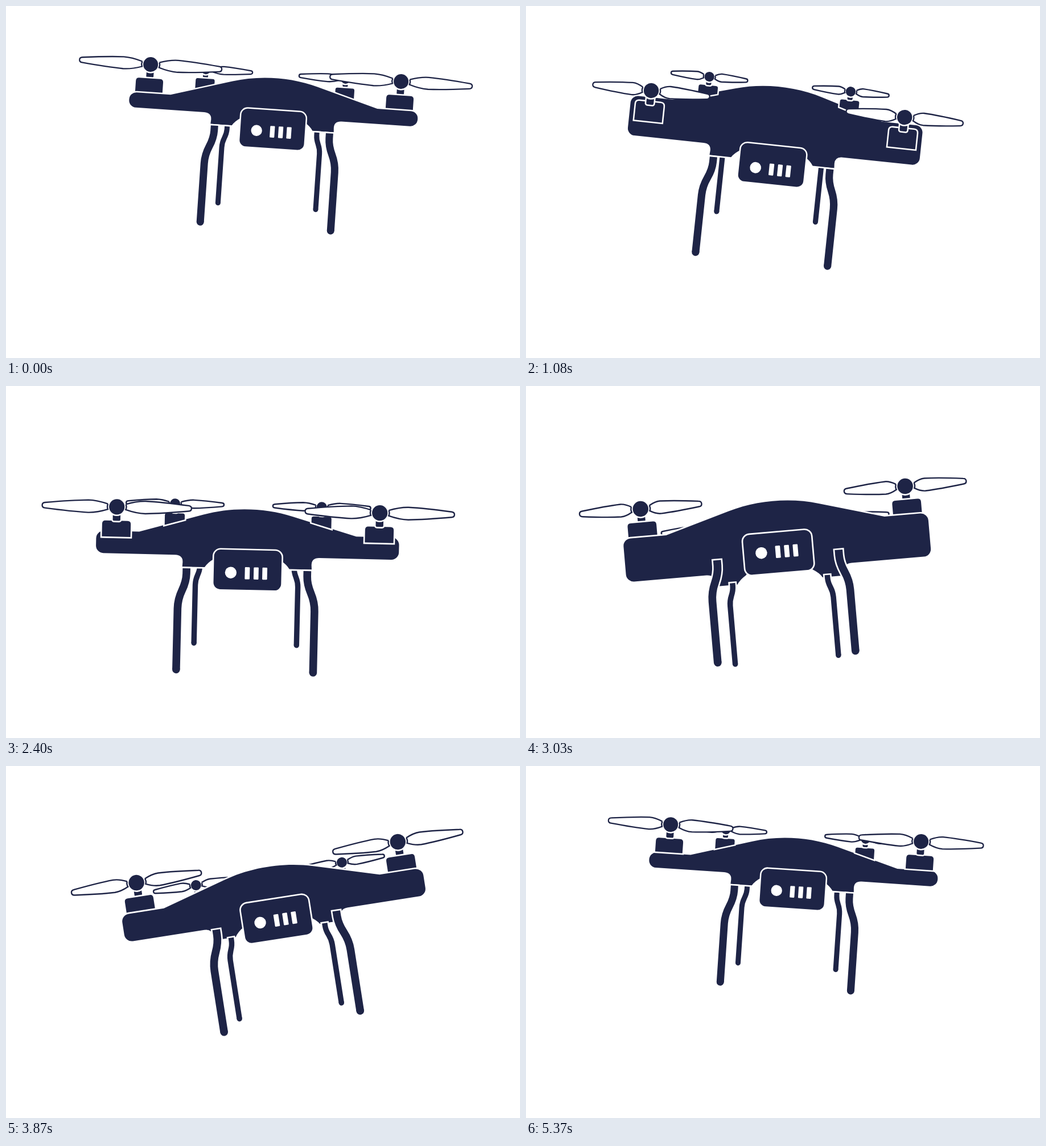
Animation, 903 px wide and 620 px high, one loop 5.4 s. Source, as an HTML page with a canvas:

```html
<!DOCTYPE html>
<html lang="en">
<head>
<meta charset="utf-8">
<title>Drone</title>
<style>
  html, body { margin: 0; width: 100%; height: 100%; overflow: hidden; background: #fff; }
  canvas { display: block; }
</style>
</head>
<body>
<canvas id="stage" width="903" height="620"></canvas>
<script>
const ctx = document.getElementById('stage').getContext('2d');
const NAVY = '#1e2446', WHITE = '#fff';
const LOOP = 5400, STEP = 30, GAP = 2.5;

// time, centre x, centre y, roll in degrees, scale, pitch
const KEYS = [
  [0, 467.4, 217, 3.9, 1, 0],
  [1080, 431.3, 279.8, 6.03, 1.015, .65],
  [1770, 416.5, 333.3, 6.44, 1.032, 1],
  [3030, 442, 293.1, -4.92, 1.058, -.7],
  [3870, 474.4, 269.5, -8.91, 1.054, -.3],
  [4530, 484.3, 242.2, -3.05, 1.027, -.03],
  [LOOP, 467.4, 217, 3.9, 1, 0]
];

function slope(i, c) {
  if (i === 0 || i === KEYS.length - 1) return 0;
  const [a, b, d] = [KEYS[i - 1], KEYS[i], KEYS[i + 1]];
  const h1 = b[0] - a[0], h2 = d[0] - b[0];
  return ((b[c] - a[c]) / h1 * h2 + (d[c] - b[c]) / h2 * h1) / (h1 + h2);
}

function poseAt(t) {
  let i = 0;
  while (t >= KEYS[i + 1][0]) i++;
  const a = KEYS[i], b = KEYS[i + 1], h = b[0] - a[0], u = (t - a[0]) / h;
  const mix = u * u * (3 - 2 * u);
  return [1, 2, 3, 4, 5].map(c => a[c] + (b[c] - a[c]) * mix
    + h * slope(i, c) * u * (1 - u) ** 2 - h * slope(i + 1, c) * u * u * (1 - u));
}

// White outline first, so overlapping dark parts stay separated
function paint(path) {
  ctx.strokeStyle = WHITE;
  ctx.lineWidth = GAP * 2;
  ctx.stroke(path);
  ctx.fillStyle = NAVY;
  ctx.fill(path);
}

function box(x, y, w, h, r) {
  const path = new Path2D();
  path.roundRect(x, y, w, h, r);
  return path;
}

function disc(x, y, r) {
  const path = new Path2D();
  path.arc(x, y, r, 0, 7);
  return path;
}

// squeeze runs from 0 (full length) to 1 (shortest)
function blade(x, y, k, dir, squeeze) {
  const len = 125.5 - 47 * squeeze, wide = 48 - 30 * squeeze;
  const path = new Path2D();
  path.moveTo(15, -4.5);
  path.quadraticCurveTo(7 + wide * .55, -10.5, wide, -10.5);
  path.quadraticCurveTo(wide + (len - wide) * .35, -9.6, len - 5, -4.6);
  path.bezierCurveTo(len + 1.3, -4, len + 1.3, 4, len - 5, 4.6);
  path.quadraticCurveTo(wide + (len - wide) * .35, 9.6, wide, 10.5);
  path.quadraticCurveTo(7 + wide * .55, 10.5, 15, 4.5);
  path.quadraticCurveTo(17, 0, 15, -4.5);
  ctx.save();
  ctx.translate(x, y);
  ctx.scale(dir * k, k);
  ctx.fillStyle = WHITE;
  ctx.fill(path);
  ctx.strokeStyle = NAVY;
  ctx.lineWidth = 2.3 / k;
  ctx.stroke(path);
  ctx.restore();
}

function rotor(x, hub, k, half, top, bottom, tilt, neck, neckHalf, squeeze, p) {
  const block = new Path2D(), r = 5.5 * k, lean = tilt * half;
  block.moveTo(x - half, bottom - lean);
  block.lineTo(x - half, top + r);
  block.quadraticCurveTo(x - half, top, x - half + r, top);
  block.lineTo(x + half - r, top);
  block.quadraticCurveTo(x + half, top, x + half, top + r);
  block.lineTo(x + half, bottom + lean);
  block.closePath();
  const stem = box(x - neckHalf, hub + 5, neckHalf * 2, neck - hub - 5, [0, 0, 2, 2]);
  (p > 0 ? [block, stem] : [stem, block]).forEach(paint);
  paint(disc(x, hub, 13 * k));
  blade(x, hub, k, -1, squeeze);
  blade(x, hub, k, 1, squeeze);
}

function rearRotors(p, squeeze) {
  const hub = -97.2 - 68.5 * p + 2.1 * p * p;
  for (const side of [-1, 1])
    rotor(side * 123, hub, .655, 16.7, -81 - 69 * p, -67 - 62.6 * p + (p > 0 ? 0 : 4),
      side * .29, hub + 14.5, 4.5, squeeze, p);
}

function frontRotors(p, squeeze) {
  const top = -74.7 - (p > 0 ? 18 : 8) * p;
  for (const side of [-1, 1])
    rotor(side * 220.5, -99.2 - 10.8 * p, 1, 24, top, -50 - 4.5 * p + (p > 0 ? 0 : 4),
      0, -76 - 9 * p, 6.4, squeeze, p);
}

// The hull is one outline swept between its near and far faces
function drawBody(p) {
  const near = -6 * p, far = -71 * p;
  const up = Math.min(near, far), low = Math.max(near, far);
  const T = -48.4 + up, B = -21.8 + low, r = 12.6;
  const path = new Path2D();
  path.moveTo(-182, T);
  path.lineTo(-75, -79.5 + up);
  path.bezierCurveTo(-28, -93.6 + up, 28, -93.6 + up, 75, -79.5 + up);
  path.lineTo(182, T);
  path.arcTo(254, T, 254, B, r);
  path.arcTo(254, B, 121, B, r);
  path.lineTo(121, B);
  path.quadraticCurveTo(108, B, 108, B + 12);
  path.lineTo(108.5, -2 + low);
  path.lineTo(71, -2 + low);
  path.quadraticCurveTo(66, -10 + low, 56, -16 + low);
  path.lineTo(48, -24 + low);
  path.lineTo(-48, -24 + low);
  path.lineTo(-56, -16 + low);
  path.quadraticCurveTo(-66, -10 + low, -71, -2 + low);
  path.lineTo(-108.5, -2 + low);
  path.lineTo(-108, B + 12);
  path.quadraticCurveTo(-108, B, -121, B);
  path.arcTo(-254, B, -254, T, r);
  path.arcTo(-254, T, -182, T, r);
  path.closePath();
  paint(path);
}

function leg(side, x0, x1, top, bend, foot, width) {
  const trace = y => {
    const path = new Path2D();
    path.moveTo(side * x0, y);
    path.lineTo(side * x0, top + bend * .15);
    path.quadraticCurveTo(side * x0, top + bend * .37, side * (x0 + x1) / 2, top + bend * .62);
    path.quadraticCurveTo(side * x1, top + bend * .87, side * x1, top + bend * 1.13);
    path.lineTo(side * x1, foot);
    return path;
  };
  ctx.strokeStyle = WHITE;
  ctx.lineWidth = width + GAP * 2;
  ctx.stroke(trace(top - GAP));
  ctx.strokeStyle = NAVY;
  ctx.lineWidth = width;
  ctx.stroke(trace(top));
  ctx.fillStyle = NAVY;
  ctx.fill(disc(side * x1, foot, width / 2));
}

function rearLegs(p) {
  for (const side of [-1, 1])
    leg(side, 79, 86, .5 - 63 * p, 33, 136 - 66 * p - 6 * p * p, 9);
}

function frontLegs(p) {
  for (const side of [-1, 1])
    leg(side, 101.3, 114.8, .5 - 5.5 * p, 60, 171.5 - 7.5 * p - 5 * p * p, 13);
}

function camera(p) {
  paint(box(-55.6, -33.2, 113.4, 66.6, 11));
  const y = 4.1 + 6.6 * p - 1.6 * p * p;
  ctx.fillStyle = WHITE;
  ctx.fill(disc(-27, y, 9.7));
  for (const x of [.7, 15.5, 30]) ctx.fill(box(x - 4.1, y - 9.8, 8.2, 20.4, 1.2));
}

function draw(t) {
  const tick = Math.floor(t / STEP), beat = tick % 5;
  const squeeze = beat < 2 ? beat / 2 : (5 - beat) / 3;
  const [x, y, roll, scale, p] = poseAt(tick * STEP);
  ctx.setTransform(1, 0, 0, 1, 0, 0);
  ctx.fillStyle = WHITE;
  ctx.fillRect(0, 0, 903, 620);
  ctx.translate(x, y);
  ctx.rotate(roll * Math.PI / 180);
  ctx.scale(scale, scale);
  if (p > 0) {
    rearLegs(p);
    drawBody(p);
    rearRotors(p, squeeze);
    frontRotors(p, squeeze);
  } else {
    rearRotors(p, squeeze);
    frontRotors(p, squeeze);
    drawBody(p);
    rearLegs(p);
  }
  frontLegs(p);
  camera(p);
}

const start = performance.now();
function frame() {
  draw((performance.now() - start) % LOOP);
  requestAnimationFrame(frame);
}
frame();
</script>
</body>
</html>
```
